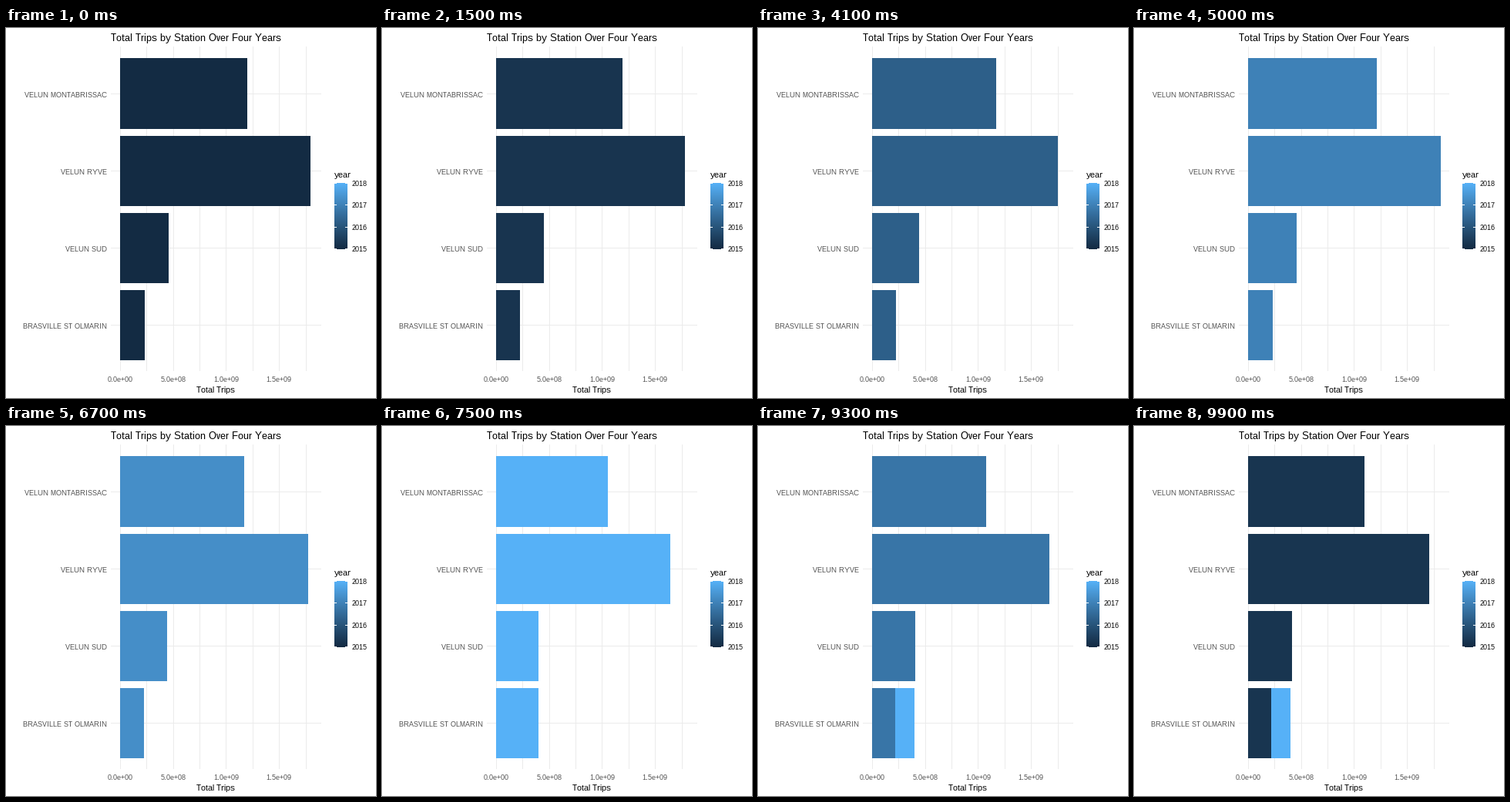
Write a matplotlib script that moves like this. It is 480 by 480 pixels and loops after 10000 ms.

```python
import numpy as np
import matplotlib
import matplotlib.pyplot as plt
from matplotlib.animation import FuncAnimation
from matplotlib.patches import Rectangle

matplotlib.rcParams.update({
    "font.family": "Liberation Sans",
    "text.hinting": "native",
    "text.hinting_factor": 1,
    "text.kerning_factor": 6,
})

SIZE, DPI = 480, 100
FRAMES, INTERVAL = 100, 100
GRID, AXIS_TEXT = "#EBEBEB", "#4D4D4D"
X0, HALF_STEP = 148, 34.37          # zero line, pixels per 2.5e8 trips

STATIONS = ["VELUN MONTABRISSAC", "VELUN RYVE", "VELUN SUD", "BRASVILLE ST OLMARIN"]
BAR_ROWS = [(39, 131), (140, 231), (240, 331), (340, 431)]

# Right edges of the four bars in pixels, one row per year
ENDS = np.array([
    [313.20, 395.05, 210.80, 179.58],
    [307.00, 385.95, 207.90, 179.20],
    [314.90, 398.00, 210.90, 179.70],
    [293.20, 374.20, 202.75, 178.40],
])
WRAP_ENDS = np.array([299.50, 384.04, 204.75, 178.20])
EXTRA_END = 203                     # second 2018 entry of the last station

# (first frame, last frame, year index at start, at end, bar ends at end)
MOVES = [
    (12, 25, 0, 1, ENDS[1]),
    (38, 50, 1, 2, ENDS[2]),
    (64, 75, 2, 3, ENDS[3]),
    (88, 100, 3, 0, WRAP_ENDS),
]

RGB_TO_XYZ = np.array([[.4124, .3576, .1805], [.2126, .7152, .0722], [.0193, .1192, .9505]])
WHITE = RGB_TO_XYZ.sum(axis=1)


def to_lab(hex_color):
    """Cube-root response of XYZ: linear in CIE Lab."""
    c = np.array(matplotlib.colors.to_rgb(hex_color))
    linear = np.where(c > .04045, ((c + .055) / 1.055) ** 2.4, c / 12.92)
    t = RGB_TO_XYZ @ linear / WHITE
    return np.where(t > .008856, np.cbrt(t), 7.787 * t + 16 / 116)


def from_lab(f):
    t = np.where(f > .2069, f ** 3, (f - 16 / 116) / 7.787)
    linear = np.clip(np.linalg.solve(RGB_TO_XYZ, t * WHITE), 0, 1)
    return np.where(linear > .0031308, 1.055 * linear ** (1 / 2.4) - .055, 12.92 * linear)


LOW, HIGH = to_lab("#132B43"), to_lab("#56B1F7")


def year_color(year):
    """Gradient colour for a year index between 0 (2015) and 3 (2018)."""
    return np.clip(from_lab(LOW + (HIGH - LOW) * year / 3), 0, 1)


fig = plt.figure(figsize=(SIZE / DPI, SIZE / DPI), dpi=DPI, facecolor="white")
ax = fig.add_axes([0, 0, 1, 1])


def box(x, y, w, h, color, z=1):
    return ax.add_patch(Rectangle((x, y), w, h, facecolor=color, linewidth=0,
                                  antialiased=False, zorder=z))


def label(x, y, text, px, color="black", ha="left"):
    ax.text(x, y, text, fontsize=px * 72 / DPI, color=color, ha=ha, va="baseline")


# Grid and axis labels
for i in range(8):
    x = X0 + HALF_STEP * i
    box(round(x), 24, 1, 421, GRID)
    if i % 2 == 0:
        value = f"{i * 2.5e8:.1e}"
        label(x, 459, value, 9, AXIS_TEXT, "center")
for i, name in enumerate(STATIONS):
    box(136, 85 + 100 * i, 273, 1, GRID)
    label(131, 90 + 100 * i, name, 9, AXIS_TEXT, "right")
label(135.5, 17, "Total Trips by Station Over Four Years", 13)
label(272, 473, "Total Trips", 11, ha="center")

# Colour bar
label(426, 194, "year", 11)
ramp = np.array([[year_color(y)] for y in np.linspace(3, 0, 86)])
ax.imshow(ramp, extent=(426, 443, 287, 201), aspect="auto", interpolation="nearest", zorder=1)
for i in range(4):
    y = 201 + 28.4 * i
    box(426, round(y), 3, 1, "white", 2)
    box(440, round(y), 3, 1, "white", 2)
    label(449, round(y + 4), str(2018 - i), 9)

# Bars; the extra one sits beneath the last bar
extra = box(X0, BAR_ROWS[3][0], EXTRA_END - X0, 91, year_color(3), 3)
bars = [box(X0, top, 1, bottom - top, "black", 4) for top, bottom in BAR_ROWS]

ax.set_xlim(0, SIZE)
ax.set_ylim(SIZE, 0)
ax.axis("off")


def state(frame):
    """Year index and bar ends at a frame."""
    year, ends = 0, ENDS[0]
    for first, last, start, stop, target in MOVES:
        if frame <= first:
            break
        t = min((frame - first) / (last - first), 1)
        year = start + (stop - start) * t
        ends = ENDS[start] + (target - ENDS[start]) * t
    return year, ends


def update(frame):
    year, ends = state(frame)
    color = year_color(year)
    for bar, end in zip(bars, ends):
        bar.set_width(np.floor(end + .5) - X0)
        bar.set_facecolor(color)
    extra.set_visible(frame >= 75)
    return [*bars, extra]


anim = FuncAnimation(fig, update, frames=FRAMES, interval=INTERVAL, repeat=True, blit=False)
plt.show()
```
